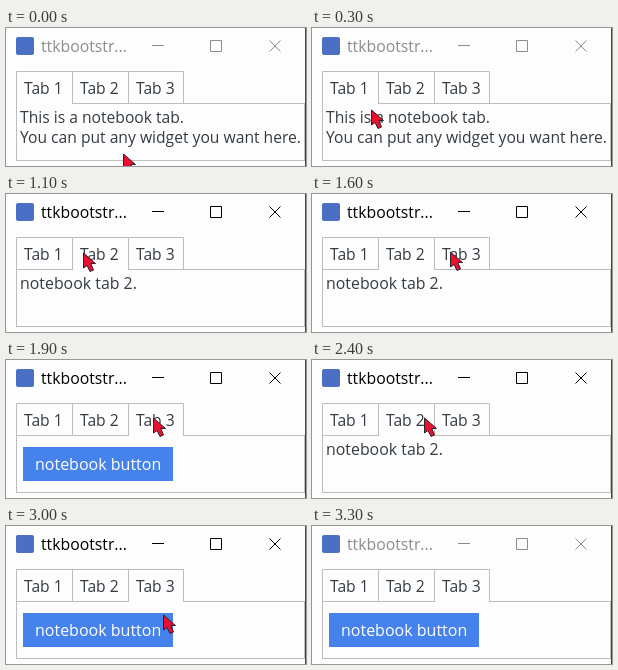
Recreate the animation shown at these times as an HTML page. Size 300 px wide and 138 px high, loop 3700 ms.

```html
<!DOCTYPE html>
<html lang="en">
<head>
<meta charset="utf-8">
<title>Notebook tabs</title>
<style>
html, body { margin: 0; width: 100%; height: 100%; overflow: hidden; background: #fdfdfd; }
svg { display: block; width: 300px; height: 138px; }
text { font: 15.65px "Open Sans", "Noto Sans", sans-serif; fill: #343c43; }
#title { font-size: 15.8px; fill: currentColor; }
.line { fill: none; stroke: #bdbdbd; }
.glyph { fill: none; stroke: currentColor; }
</style>
</head>
<body>
<svg viewBox="0 0 300 138">
  <rect width="300" height="138" fill="#fdfdfd"/>
  <rect x="299" width="1" height="138" fill="#444"/>
  <g id="bar">
    <rect x="10" y="9" width="18" height="18" rx="2" fill="#4a6fc4"/>
    <text id="title" x="35" y="24">ttkbootstr...</text>
    <path class="glyph" d="M146 17.5h12M204.5 12.5h11v11h-11zM263.5 12.5l11 11m0-11l-11 11"/>
  </g>
  <rect class="line" x="10.5" y="75.5" width="288" height="57"/>
  <g id="tabs"></g>
  <path id="gap" stroke="#fdfdfd"/>
  <g class="page">
    <text x="14" y="95">This is a notebook tab.</text>
    <text x="14" y="115">You can put any widget you want here.</text>
  </g>
  <g class="page"><text x="14" y="95" style="font-size:15.9px">notebook tab 2.</text></g>
  <g class="page">
    <rect x="17" y="87" width="150" height="34" fill="#4582ec"/>
    <text x="29" y="110" style="font-size:16px;fill:#fff">notebook button</text>
  </g>
  <path id="cursor" d="M.5 1V16L4 13.5L7 19.5L10.5 18L7.8 11.5H12.5Z" fill="#e8102e" stroke="#30222c"/>
</svg>
<script>
const LOOP = 3700, STEP = 100, REST = 150;
const $ = id => document.getElementById(id);
const pages = document.querySelectorAll(".page");
const edge = i => Math.min(10.5 + 56 * i, 177.5);

$("tabs").innerHTML = [0, 1, 2].map(i =>
  `<path class="line" d="M${edge(i)} 75V43.5H${edge(i + 1)}V75"/>
   <text x="${18 + 56 * i}" y="66">Tab ${i + 1}</text>`).join("");

// The pointer rests briefly at each place, then clicks at the given time
const visits = [
  { at: 0, x: 117, y: 125, tab: 0 },
  { at: 600, x: 39, y: 65, tab: 0 },
  { at: 1100, x: 77, y: 58, tab: 1 },
  { at: 1900, x: 147, y: 57, tab: 2 },
  { at: 2400, x: 112, y: 57, tab: 1 },
  { at: 2900, x: 149, y: 60, tab: 2 },
  { at: 3300, x: 172, y: 140, tab: 2 }
];

const ease = u => u * u * (3 - 2 * u);
const mix = (a, b, u) => Math.round(a + (b - a) * u);

function draw(now) {
  const t = Math.floor(now % LOOP / STEP) * STEP;
  const i = visits.findLastIndex(v => v.at <= t);
  const from = visits[i], to = visits[i + 1] || from;
  const u = ease(Math.min(1, (t - from.at) / (to.at - REST - from.at)));
  const active = t >= visits[1].at && to !== from;

  $("bar").setAttribute("color", active ? "#000" : "#8d8d8d");
  pages.forEach((p, k) => p.style.display = k === from.tab ? "" : "none");
  $("gap").setAttribute("d", `M${edge(from.tab) + .5} 75.5H${edge(from.tab + 1) - .5}`);
  $("cursor").setAttribute("transform", `translate(${mix(from.x, to.x, u)} ${mix(from.y, to.y, u)})`);
}

const start = performance.now();
function tick() {
  draw(performance.now() - start);
  requestAnimationFrame(tick);
}
tick();
</script>
</body>
</html>
```
